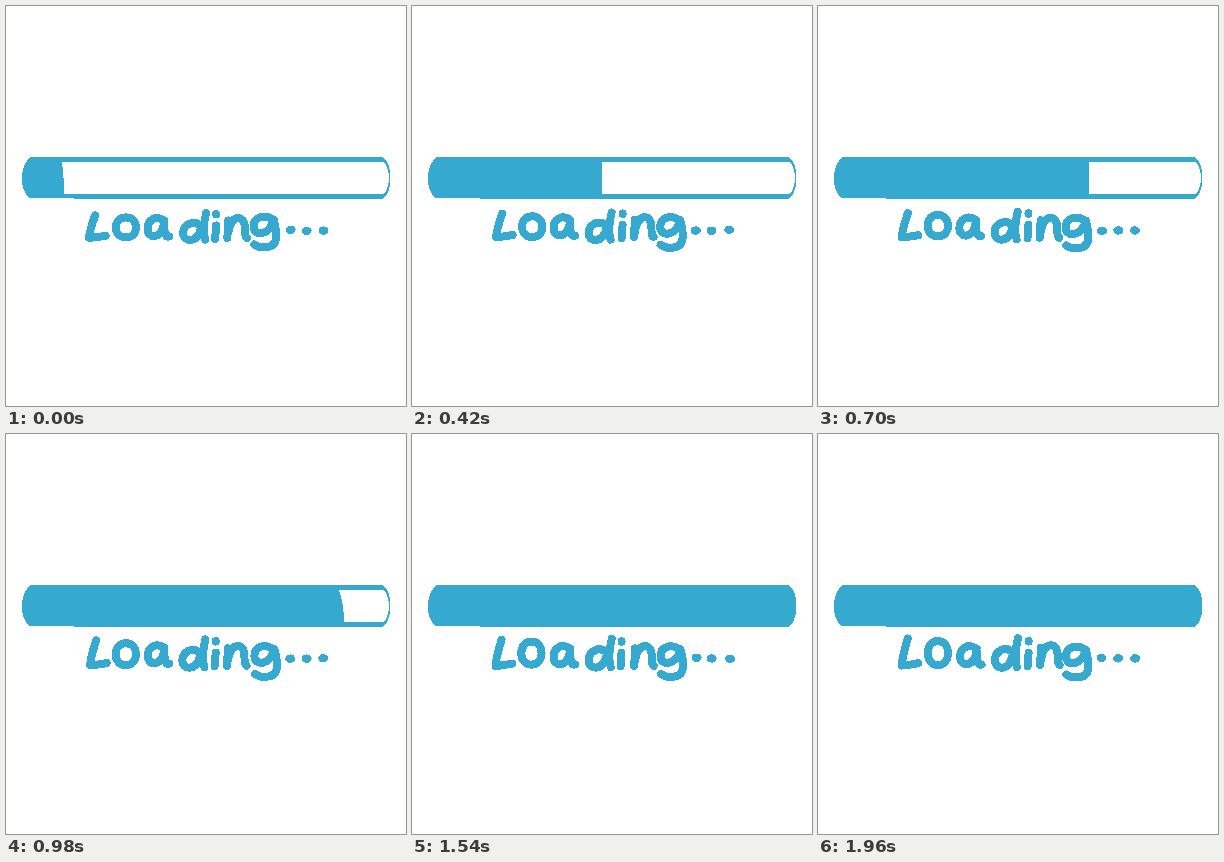
Animation, 400 px wide and 400 px high, one loop 2100 ms. Source, as an HTML page:

```html
<!DOCTYPE html>
<html lang="en">
<head>
<meta charset="utf-8">
<title>Loading</title>
<style>
  html, body { margin: 0; width: 100%; height: 100%; overflow: hidden; background: #fff; }
  svg { display: block; width: 100vw; height: 100vh; shape-rendering: crispEdges; }
  .ink { fill: #36a9d1; }
  .pen {
    fill: none; stroke: #36a9d1; stroke-width: 8;
    stroke-linecap: round; stroke-linejoin: round; vector-effect: non-scaling-stroke;
  }
</style>
</head>
<body>
<svg viewBox="0 0 400 400" role="img" aria-label="Loading...">
  <path class="ink" d="M25 151H377C382 155 384.5 163 384.5 172C384.5 181 382 189 377 193H68V192H24C18 188 16 181 16 172C16 163 19 155 25 151Z"/>
  <path id="gap" fill="#fff"/>
  <g id="word"></g>
</svg>
<script>
const STEP = 140, STEPS = 15, FULL = 9, BASELINE = 232;

// grow: extra height by the end of the loop; sink: downward drift.
const glyphs = [
  { d: 'M89.5 209C87 216 84 225 83.5 231.5C89 231.5 94 230.5 100 229.5', grow: .2 },
  { d: 'M120 211C133.500 211 133.500 231 120 231C106.500 231 106.500 211 120 211Z', grow: .2 },
  { d: 'M158 214C149 208 141.500 214 141.500 222.500C142 233 156 233 158 216C158 225 159 231 163 230' },
  { d: 'M195 220C187 213 177 219 177 227C177 236 191 238 195 222M200 207C198 215 196 225 199 233.500', grow: .1 },
  { d: 'M210 207.500V208M210 219L209 232.500' },
  { d: 'M222.500 214L221.500 231.500M222.500 226C225 208 238 208 239 220C239 226 239 230 241 231.500' },
  { d: 'M267 214C258 208 248 212 248 221C248 231 264 231 268 214C270 222 275 240 262 241.500C257 242.500 252 241.500 248.500 239', sink: 2 },
  { dot: 284 },
  { dot: 300 },
  { dot: 317.5 }
];

const gap = document.getElementById('gap');
const word = document.getElementById('word');

function make(tag, attrs) {
  const el = document.createElementNS('http://www.w3.org/2000/svg', tag);
  for (const k in attrs) el.setAttribute(k, attrs[k]);
  return word.appendChild(el);
}

const parts = glyphs.map(({ d, dot }) => dot
  ? make('ellipse', { class: 'ink', cx: dot, cy: 224.3, rx: 5, ry: 4.2 })
  : make('path', { class: 'pen', d }));

// Seeded value from -1 to 1.
function noise(n) {
  const v = Math.sin(n * 127.1 + 3) * 43758.5453;
  return (v - Math.floor(v)) * 2 - 1;
}

// Slightly slowing fill.
const ease = u => u * (1.2 + .17 * u - .37 * u * u);

function drawGap(step) {
  if (step >= FULL) return gap.setAttribute('d', '');
  const x = Math.round(58 + 325 * ease(step / FULL));
  const lean = step > 6 ? 5 : step ? 0 : 2;
  gap.setAttribute('d', `M${x - lean} 156H378C381 160 383 166 383 172` +
    `C383 178 381 184 378 188H${x}Q${x} 171 ${x - lean} 156Z`);
}

function drawWord(step) {
  const p = step / (STEPS - 1);
  glyphs.forEach(({ grow = 0, sink = 0 }, i) => {
    const seed = 2 * (step * glyphs.length + i);
    const sy = 1 + grow * p;
    const dx = .7 * noise(seed);
    const dy = .6 * noise(seed + 1) + sink * p + BASELINE * (1 - sy);
    parts[i].setAttribute('transform', `translate(${dx} ${dy}) scale(1 ${sy})`);
  });
}

let start, shown = -1;
function show(step) {
  if (step === shown) return;
  shown = step;
  drawGap(step);
  drawWord(step);
}
function tick(now) {
  start ??= now;
  show(Math.floor((now - start) / STEP) % STEPS);
  requestAnimationFrame(tick);
}
show(0);
requestAnimationFrame(tick);
</script>
</body>
</html>
```
